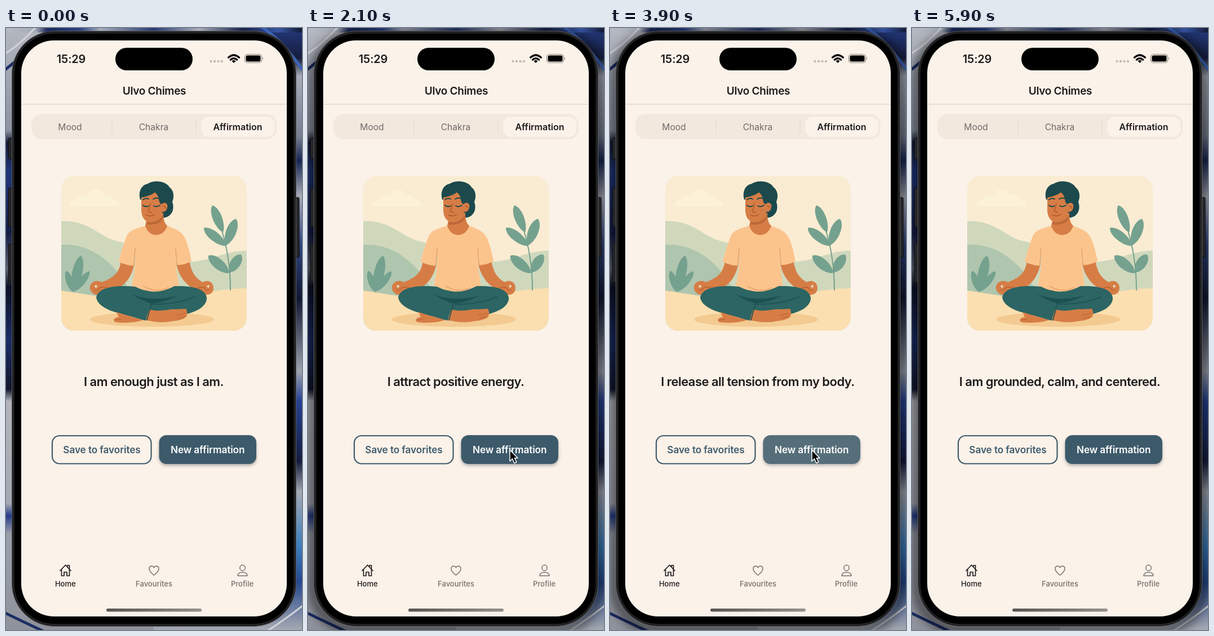
Recreate the animation shown at these times as an HTML page. Size 525 by 1066 pixels, loop 6000 ms.

```html
<!DOCTYPE html>
<html lang="en">
<head>
<meta charset="utf-8">
<title>Affirmations</title>
<style>
  html, body { margin: 0; width: 100%; height: 100%; overflow: hidden; background: #111; }
  svg { display: block; width: 100%; height: 100%; }
  text { font-family: Inter, Roboto, sans-serif; text-anchor: middle; fill: #1d1b1b; }
  .line { fill: none; stroke-linecap: round; stroke-linejoin: round; }
  .semi { font-weight: 600; }
  .tab { font-size: 15.6px; fill: #6e6a68; }
  .nav { font-size: 13px; font-weight: 500; }
  .button { font-size: 17.2px; font-weight: 600; letter-spacing: -.005em; }
  .muted { fill: #74706e; }
  .phrase { font-size: 22px; font-weight: 600; letter-spacing: -.025em; visibility: hidden; }
  .phrase, .focus { animation: 6s step-end infinite; }
  .p1 { animation-name: p1; }
  .p2 { animation-name: p2; }
  .p3 { animation-name: p3; }
  .p4 { animation-name: p4; }
  .p5 { animation-name: p5; }
  .focus { animation-name: focus; }
  .press { animation: press 6s ease-in-out infinite; }
  .cursor { animation: point 6s ease-in-out infinite; }
  @keyframes p1 { 0% { visibility: visible } 19.1%, 100% { visibility: hidden } }
  @keyframes p2 { 0% { visibility: hidden } 19.1% { visibility: visible } 48%, 100% { visibility: hidden } }
  @keyframes p3 { 0% { visibility: hidden } 48% { visibility: visible } 63.5%, 100% { visibility: hidden } }
  @keyframes p4 { 0% { visibility: hidden } 63.5% { visibility: visible } 76%, 100% { visibility: hidden } }
  @keyframes p5 { 0% { visibility: hidden } 76%, 100% { visibility: visible } }
  @keyframes focus { 0% { opacity: 0 } 16.6%, 100% { opacity: 1 } }
  @keyframes press {
    0%, 16.6%, 23.4%, 45%, 52%, 61%, 67.7%, 72.5%, 80%, 100% { opacity: 1 }
    18.2%, 19.1%, 47%, 48%, 62.7%, 63.5%, 74.8%, 76% { opacity: .82 }
  }
  @keyframes point {
    0%, 9% { transform: translate(545px, 1080px) }
    16%, 21% { transform: translate(358px, 743px) }
    27%, 83% { transform: translate(358px, 747px) }
    92%, 100% { transform: translate(545px, 1080px) }
  }
</style>
</head>
<body>
<svg viewBox="0 0 525 1066" preserveAspectRatio="none">
  <defs>
    <linearGradient id="wallLeft" x2="0" y2="1">
      <stop offset="0" stop-color="#b4b7bf"/><stop offset=".17" stop-color="#8c93a3"/>
      <stop offset=".19" stop-color="#141a33"/><stop offset=".24" stop-color="#20377c"/>
      <stop offset=".34" stop-color="#131c45"/><stop offset=".4" stop-color="#5b606e"/>
      <stop offset=".43" stop-color="#0d1126"/><stop offset=".52" stop-color="#1b2c66"/>
      <stop offset=".6" stop-color="#12172c"/><stop offset=".62" stop-color="#b3b5bb"/>
      <stop offset=".79" stop-color="#a5a8b2"/><stop offset=".81" stop-color="#263e8b"/>
      <stop offset=".84" stop-color="#9b9faa"/><stop offset="1" stop-color="#8f929b"/>
    </linearGradient>
    <linearGradient id="wallRight" x2="0" y2="1">
      <stop offset="0" stop-color="#23397c"/><stop offset=".05" stop-color="#151c3c"/>
      <stop offset=".08" stop-color="#a6abb6"/><stop offset=".18" stop-color="#777e91"/>
      <stop offset=".22" stop-color="#182653"/><stop offset=".28" stop-color="#a9adb8"/>
      <stop offset=".36" stop-color="#30447f"/><stop offset=".45" stop-color="#111832"/>
      <stop offset=".57" stop-color="#9da2ae"/><stop offset=".62" stop-color="#264294"/>
      <stop offset=".72" stop-color="#151d3f"/><stop offset=".77" stop-color="#a4a8b2"/>
      <stop offset=".86" stop-color="#3d7fbd"/><stop offset=".92" stop-color="#25488f"/>
      <stop offset="1" stop-color="#a6a9b1"/>
    </linearGradient>
    <linearGradient id="wallTop">
      <stop offset="0" stop-color="#b7bac2"/><stop offset=".1" stop-color="#a4abb9"/>
      <stop offset=".14" stop-color="#182655"/><stop offset=".25" stop-color="#2c4385"/>
      <stop offset=".32" stop-color="#a5abb9"/><stop offset=".5" stop-color="#293a70"/>
      <stop offset=".65" stop-color="#a8adb8"/><stop offset=".8" stop-color="#17214a"/>
      <stop offset=".92" stop-color="#3756a4"/><stop offset="1" stop-color="#131a37"/>
    </linearGradient>
    <linearGradient id="homeBar">
      <stop offset="0" stop-color="#585553"/><stop offset="1" stop-color="#96918d"/>
    </linearGradient>
    <filter id="drop" x="-10%" y="-20%" width="120%" height="160%">
      <feDropShadow dx="0" dy="3" stdDeviation="2.5" flood-color="#26333c" flood-opacity=".35"/>
    </filter>
    <filter id="blur"><feGaussianBlur stdDeviation="9"/></filter>
    <clipPath id="card"><rect x="98" y="262" width="329" height="274" rx="23"/></clipPath>
  </defs>

  <!-- Wallpaper -->
  <path fill="url(#wallLeft)" d="M0 0H263V1066H0z"/>
  <path fill="url(#wallRight)" d="M262 0H525V1066H262z"/>
  <path fill="url(#wallTop)" d="M0 0H525V8H0z"/>
  <g class="line" stroke-width="5">
    <path stroke="#1c2d66" d="M-4 76Q35 45 84 -5M-5 1034Q25 1049 75 1072"/>
    <path stroke="#d2d4d9" stroke-width="3" d="M-4 47Q25 30 55 -4M530 1020Q500 1044 460 1070"/>
    <path stroke="#3b64b8" d="M450 -4Q490 20 530 80"/>
  </g>
  <g class="focus">
    <rect x="10" y="12" width="505" height="1054" rx="76" fill="none" stroke="#000" stroke-opacity=".55" stroke-width="18" filter="url(#blur)"/>
  </g>

  <!-- Phone body -->
  <g fill="#25262a" stroke="#0d0d0f">
    <rect x="4.5" y="195" width="9" height="37" rx="2"/>
    <rect x="4.5" y="283" width="9" height="69" rx="2"/>
    <rect x="4.5" y="382" width="9" height="68" rx="2"/>
    <rect x="511" y="300" width="9" height="106" rx="2"/>
  </g>
  <rect x="10.5" y="5.5" width="504" height="1054" rx="76" fill="#1d1d1f" stroke="#5a5a5c"/>
  <rect x="14" y="9" width="497" height="1047" rx="72" fill="#000" stroke="#343436"/>
  <rect x="27" y="22" width="471" height="1020" rx="58" fill="#fbf2e9"/>
  <rect x="194" y="35" width="137" height="40" rx="20"/>

  <!-- Status bar -->
  <text class="semi" x="115.5" y="61.5" font-size="20" letter-spacing="-.2">15:29</text>
  <g fill="#c5bdb6">
    <circle cx="363.5" cy="59" r="2.2"/><circle cx="370" cy="59" r="2.2"/>
    <circle cx="376.5" cy="59" r="2.2"/><circle cx="383" cy="59" r="2.2"/>
  </g>
  <g class="line" stroke="#000" stroke-width="3.2" stroke-linecap="butt">
    <path d="M394.5 52.2Q404 43.8 413.5 52.2M398.3 56.2Q404 51.3 409.7 56.2"/>
  </g>
  <path d="M400.5 58.4Q404 55.6 407.5 58.4L404 62z"/>
  <rect x="423.5" y="46.5" width="30" height="15" rx="4.8" fill="none" stroke="#8d8883" stroke-width="1.2"/>
  <rect x="425.5" y="48.5" width="26" height="11" rx="3"/>
  <path fill="#8d8883" d="M455.2 51.5Q457.4 54 455.2 56.5z"/>

  <!-- Header and tabs -->
  <text class="semi" x="263" y="117.5" font-size="19" letter-spacing="-.28">Ulvo Chimes</text>
  <path stroke="#e0d8d0" stroke-width="1.3" d="M27 135H498"/>
  <rect x="45" y="152.5" width="435" height="44.5" rx="18" fill="#f2e8de"/>
  <path stroke="#e8ddd3" stroke-width="1.2" d="M188 163V187M337 163V187"/>
  <rect x="346" y="157" width="130.500" height="36" rx="14" fill="#fbf2e9"/>
  <text class="tab" x="113.500" y="180.500">Mood</text>
  <text class="tab" x="262" y="180.500">Chakra</text>
  <text class="semi" x="411" y="180.500" font-size="16">Affirmation</text>

  <!-- Illustration -->
  <g clip-path="url(#card)">
    <path fill="#f9ecd2" d="M98 262H427V536H98z"/>
    <path fill="#fcf2d7" d="M113 316C114 306 122 303 127 304C130 296 139 294 144 298C148 283 169 282 174 297C180 293 188 297 189 304C197 303 202 309 202 316z"/>
    <path fill="#d0d8bc" d="M98 342C150 340 165 371 200 378C245 388 270 420 330 414C365 411 385 396 427 394V536H98z"/>
    <path fill="#afc5ae" d="M98 384C145 380 195 410 226 478V536H98z"/>
    <path fill="#fbdfb0" d="M98 465C150 472 205 484 262 482C320 480 365 461 427 461V536H98z"/>
    <ellipse cx="259" cy="516" rx="110" ry="13" fill="#f3ca91"/>
    <g id="leaves" fill="#75a18f"></g>
    <g class="line" stroke="#75a18f" stroke-width="2">
      <path d="M398 464C398 420 391 382 380 350M120 467L130 440"/>
    </g>

    <g fill="#d67d46">
      <path d="M204 411C202 432 192 442 170 450C157 444 147 453 149 462C152 474 166 475 176 469C202 463 222 450 228 416z"/>
      <path d="M302 416C306 442 322 458 344 469C355 476 368 472 368 461C368 450 359 445 349 450C336 443 328 432 325 410z"/>
    </g>
    <path fill="#fcc48d" d="M247 350C232 355 219 357 214 369C207 387 203 401 200 414Q212 420 226 421L229 398C231 425 224 448 222 468Q264 482 307 468C306 448 301 425 301 398L304 420Q318 419 329 413C325 393 321 374 312 364C304 356 294 354 286 350z"/>
    <g class="line" stroke="#e6a56d" stroke-width="1.7">
      <path d="M229 389L227 420M301 391L303 419M244 457Q265 470 287 460M247 464Q265 473 282 468"/>
    </g>
    <path fill="#2c6563" d="M160 477C164 459 193 455 229 458Q264 476 299 457C333 456 353 462 356 477C357 492 340 502 318 507L250 518C228 509 164 505 160 477z"/>
    <path fill="#1d5052" d="M222 471Q255 486 305 474Q282 486 258 488Q237 481 222 471z"/>
    <path fill="#d67d46" d="M196 503Q220 511 244 517Q222 524 195 521C188 519 192 512 200 512zM253 498C270 503 284 499 294 498Q309 498 319 497Q323 504 320 511Q313 518 295 519Q276 524 248 517z"/>
    <path fill="#2c6563" d="M205 497Q232 492 258 487L247 518Q225 512 205 505z"/>
    <path class="line" stroke="#1d5052" stroke-width="1.6" d="M258 488L250 517M258 489Q304 490 335 476"/>
    <path class="line" stroke="#b8602f" d="M302 509L318 505M304 514L317 511M194 517L204 516"/>
    <g class="line" stroke="#b8602f" stroke-width="1.3">
      <path d="M157 464Q163 466 167 459L179 459M361 464Q354 466 351 459L340 460"/>
    </g>
    <path fill="#e9d7b4" d="M157 456l4 -1l1 4l-4 1zM356 456l5 -1l-1 5l-3 -1z"/>

    <path fill="#1c494c" d="M238 304C234 290 240 278 251 276C263 268 284 271 290 282C299 289 298 300 295 308C300 322 293 335 279 336L267 300z"/>
    <path fill="#d67d46" d="M250 335L247 350C253 372 280 372 286 350Q279 345 279 327z"/>
    <path fill="#bd6838" d="M250 343Q268 347 279 331Q279 350 249 348z"/>
    <path fill="#d67d46" d="M240 300C248 299 258 296 264 291Q271 296 272 308Q275 314 277 311C282 307 288 311 286 318C285 324 280 327 277 325C274 338 264 344 257 344C246 344 240 334 240 322z"/>
    <g class="line" stroke="#1c494c" stroke-width="1.8">
      <path d="M243 304Q248 300 253 303M261 303Q267 299 273 303M243 314Q248 318 253 315M262 315Q267 318 273 314"/>
      <path stroke="#a95128" stroke-width="1.3" d="M256 311Q255 319 252 324Q254 327 258 326M249 331Q256 335 264 330M279 316Q283 314 283 319"/>
    </g>
  </g>

  <!-- Affirmations -->
  <text class="phrase p1" x="262" y="633.500">I am enough just as I am.</text>
  <text class="phrase p2" x="262" y="633.500">I attract positive energy.</text>
  <text class="phrase p3" x="262" y="633.500">My mind is clear and focused.</text>
  <text class="phrase p4" x="262" y="633.500">I release all tension from my body.</text>
  <text class="phrase p5" x="262" y="633.500">I am grounded, calm, and centered.</text>

  <!-- Buttons -->
  <rect x="82" y="722" width="175.500" height="49.500" rx="13" fill="none" stroke="#3f5b6c" stroke-width="2.2"/>
  <text class="button" x="170" y="752.500" style="fill:#3f5b6c">Save to favorites</text>
  <g class="press">
    <rect x="271.500" y="721" width="172.500" height="51" rx="13" fill="#3d5a6b" filter="url(#drop)"/>
    <text class="button" x="357.700" y="752.500" style="fill:#fff">New affirmation</text>
  </g>

  <!-- Navigation -->
  <g class="line" stroke="#1d1b1b" stroke-width="1.7">
    <path d="M96 961L105.500 951L115 961M98.500 959V970H103V963.500H108V970H112.500V959M109 954V951.500H112.500V958"/>
    <g stroke="#74706e" stroke-width="1.5">
      <path d="M262.500 969C258 965.500 254 962 254 957.500C254 952 260 951 262.500 955.500C265 951 271 952 271 957.500C271 962 267 965.500 262.500 969z"/>
      <ellipse cx="419.500" cy="956" rx="4.700" ry="5"/>
      <path d="M411 970C411 961.500 428 961.500 428 970z"/>
    </g>
  </g>
  <text class="nav" x="105.300" y="988.500">Home</text>
  <text class="nav muted" x="262.500" y="988.500">Favourites</text>
  <text class="nav muted" x="419" y="988.500">Profile</text>
  <rect x="178" y="1028" width="169" height="5.500" rx="2.750" fill="url(#homeBar)"/>

  <g class="cursor">
    <path d="M0 0V20L4.500 15.800L8 23.500L11.800 21.800L8.400 14.500H14z" fill="#000" stroke="#fff" stroke-width="1.500" stroke-linejoin="round"/>
  </g>
</svg>
<script>
  // A leaf is two mirrored curves between its base and its tip.
  function leaf(x, y, tipX, tipY, width) {
    const dx = tipX - x, dy = tipY - y, length = Math.hypot(dx, dy);
    const nx = -dy / length * width, ny = dx / length * width;
    const side = s => [x + dx * .25 + nx * s, y + dy * .25 + ny * s,
                       x + dx * .85 + nx * s, y + dy * .85 + ny * s];
    const [a, b, c, d] = side(1), [e, f, g, h] = side(-1);
    return `M${x} ${y}C${a} ${b} ${c} ${d} ${tipX} ${tipY}C${g} ${h} ${e} ${f} ${x} ${y}z`;
  }
  const path = document.createElementNS("http://www.w3.org/2000/svg", "path");
  path.setAttribute("d", [
    [385, 362, 366, 314, 11], [390, 385, 408, 338, 12], [391, 386, 351, 354, 11],
    [396, 434, 359, 403, 12], [396, 433, 417, 401, 12],
    [118, 467, 107, 430, 8], [119, 467, 133, 403, 12], [122, 466, 148, 431, 8]
  ].map(args => leaf(...args)).join(""));
  document.getElementById("leaves").append(path);
</script>
</body>
</html>
```
